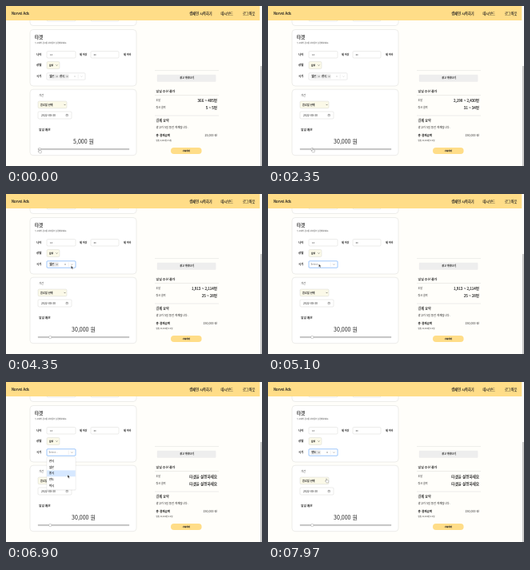
Animation of 320 by 200 pixels, one loop 8000 ms. Source, as an HTML page:

```html
<!DOCTYPE html>
<html lang="ko">
<head>
<meta charset="utf-8">
<style>
html, body { margin: 0; width: 100%; height: 100%; overflow: hidden; background: #fffefa; }
svg { display: block; width: 100%; height: 100%; }
text { font-family: "Noto Sans CJK KR", "Noto Sans CJK", "Noto Sans", sans-serif; white-space: pre; }
text[font-weight="500"] { stroke: #222; stroke-width: .13; }
</style>
</head>
<body>
<svg viewBox="0 0 320 200"><g id="page"></g><g id="live"></g></svg>
<script>
const LOOP = 8000, YELLOW = '#ffdd88', BLUE = '#4a96f8', INK = '#222';
const COUNTRIES = ['한국', '일본', '중국', '인도', '미국'];
const ROW = 7.8, MENU_TOP = 94.8;

// y is the vertical middle of the text
const text = (x, y, size, str, { fill = INK, anchor = 'start', weight = 400 } = {}) =>
  `<text x="${x}" y="${y + size * 0.37}" font-size="${size}" fill="${fill}" text-anchor="${anchor}" font-weight="${weight}">${str}</text>`;
const box = (x, y, w, h, fill, stroke = 'none', r = 0, line = 0.4) =>
  `<rect x="${x}" y="${y}" width="${w}" height="${h}" rx="${r}" fill="${fill}" stroke="${stroke}" stroke-width="${line}"/>`;
const path = (d, stroke, width = 0.5, fill = 'none') =>
  `<path d="${d}" fill="${fill}" stroke="${stroke}" stroke-width="${width}" stroke-linejoin="round"/>`;
const rule = y => path(`M186 ${y}H266`, '#d2d2d0', 0.4);
const cross = (x, y, r, color) => path(`M${x - r} ${y - r}l${2 * r} ${2 * r}m0 ${-2 * r}l${-2 * r} ${2 * r}`, color, 0.4);
const chevron = (x, y, color) => path(`M${x - 1} ${y - 0.5}l1 1l1 -1`, color);
const card = (y, h) => box(30, y, 133, h, '#fff', '#dadad7', 4, 0.5);
const field = (x, y, w, h, fill = '#fff') => box(x, y, w, h, fill, '#cfcfca', 1.5);

function drawPage() {
  const mid = { anchor: 'middle' }, bold = { weight: 500 };
  return card(-20, 44.5) + card(29.5, 70.5) + card(104.2, 82.5) +
    field(51, 10, 36, 9) + field(106, 10, 35, 9) +
    box(0, 0, 317.5, 18, YELLOW) +
    text(7, 9.2, 4.3, 'Norvel Ads', bold) +
    text(229.5, 9.2, 4.2, '캠페인 시작하기', bold) +
    text(268.5, 9.2, 4.2, '대시보드', bold) +
    text(296, 9.2, 4.2, '로그아웃', bold) +
    box(317.5, 0, 2.5, 200, '#fbfbfa') +
    box(318, 75, 1.7, 125, '#c1c1c1') +

    text(36, 39, 5.5, '타겟', bold) +
    text(36, 46, 2.4, '누구에게 광고를 보여줄지 설정해보세요.', { fill: '#444' }) +
    text(38, 60.5, 3.5, '나이', bold) +
    field(51, 56.5, 36, 8.5) + text(55, 60.8, 2.7, '14') + text(92, 60.5, 3.1, '세 이상', bold) +
    field(106, 56.5, 35, 8.5) + text(109.5, 60.8, 2.7, '40') + text(147, 60.5, 3.1, '세 이하', bold) +
    text(38, 74, 3.5, '성별', bold) +
    field(51, 69.5, 16, 9, '#fbf9e8') + text(54, 74, 2.8, '남성', bold) + chevron(63.5, 74, '#333') +
    text(38, 88, 3.5, '국가', bold) +

    text(41.5, 111.5, 3, '기간') +
    field(40, 119, 36, 8.8, '#fbf9e8') + text(43, 123.4, 3.2, '종료일 선택', bold) + chevron(73.5, 123.4, '#333') +
    field(40, 132, 42, 9) + text(44, 136.6, 3.5, '2022-08-30') +
    box(75, 135.4, 2.4, 2.4, 'none', '#333', 0.2, 0.3) + path('M75 136H77.4', '#333', 0.4) +
    text(41, 155, 3.7, '일일 예산', bold) +
    box(40, 178.3, 114, 1.3, '#d4d4d4', '#8a8a8a', 0.6, 0.35) +

    rule(80.6) + box(189, 86, 73.2, 8.5, '#eeeeee', '#e8e8e8', 0.8, 0.3) +
    text(226, 90.3, 3, '광고 미리보기', { ...mid, ...bold }) +
    text(187.6, 106.5, 3.9, '일일 추산 결과', bold) + rule(111.5) +
    text(187.6, 118, 3, '도달') + text(187.6, 127, 3, '링크 클릭') + rule(137) +
    text(187.6, 143.6, 4.1, '결제 요약', bold) +
    text(187.6, 151.3, 3.4, '광고가 5일 동안 게재됩니다.') +
    text(187.6, 161.8, 3.6, '총 결제금액', { weight: 700 }) +
    box(206, 177, 38.6, 8, YELLOW, 'none', 4) +
    text(225.4, 181, 2.7, '시작하기', { ...mid, ...bold });
}

// keys: [time, value, value...]
function along(keys, t, ease = u => u) {
  const i = keys.findIndex(k => k[0] > t);
  if (i < 0) return keys[keys.length - 1].slice(1);
  if (i === 0) return keys[0].slice(1);
  const a = keys[i - 1], b = keys[i], u = ease((t - a[0]) / (b[0] - a[0]));
  return a.slice(1).map((v, j) => v + (b[j + 1] - v) * u);
}
const smooth = u => u * u * (3 - 2 * u);
const won = n => Math.round(n).toLocaleString('en-US');

const BUDGET = [[780, 5], [960, 15], [1600, 21], [1960, 30]];
const POINTER = [
  [2300, 55.4, 179], [3130, 76.2, 87], [4030, 76.2, 87], [4350, 81.4, 89.6], [4500, 81.4, 89.6],
  [4830, 63.5, 87.5], [5750, 63.5, 87.5], [6150, 81.2, 88.6], [6330, 81.2, 88.6], [6650, 81.2, 88.6],
  [6900, 77, 116], [7250, 75.5, 128], [7500, 75.5, 128], [7780, 73, 121]
];

function estimates(t, budget) {
  if (t >= 5400) return Array(2).fill('타겟을 설정하세요');
  if (t >= 3830) return ['1,913 ~ 2,114명', '25 ~ 28명'];
  const range = (a, b) => `${won(Math.floor(budget * a))} ~ ${won(Math.floor(budget * b + 1e-6))}명`;
  return [range(0.07328, 0.081), range(0.001035, 0.001135)];
}

function chip(x, name, hot) {
  return box(x, 85.6, 12.2, 5, '#e6e6e6', 'none', 0.5) +
    (hot ? box(x + 8.4, 85.6, 3.8, 5, '#ffbdad', 'none', 0.5) : '') +
    text(x + 1, 88, 3, name, { weight: 500 }) + cross(x + 10.2, 88.1, 0.7, hot ? '#de350b' : '#333');
}

function countrySelect(t) {
  const chips = t < 3180 ? ['일본', '한국'] : t < 5100 ? ['일본'] : t < 7970 ? [] : ['인도'];
  const right = t < 3230 ? 99 : 87, focus = t >= 3750;
  const tone = focus ? '#666' : '#bbb';
  let out = box(51, 83.8, right - 51, 8.4, '#fff', focus ? BLUE : '#cccccc', 1, focus ? 0.55 : 0.4);
  chips.forEach((name, i) => {
    const hot = i === chips.length - 1 && (t > 3080 && t < 3180 || t > 4830 && t < 5100);
    out += chip(53.5 + i * 12.8, name, hot);
  });
  if (chips.length) out += cross(right - 13, 88, 0.8, tone);
  else out += text(53.5, 88, 3, 'Select...', { fill: '#777' });
  return out + path(`M${right - 8.8} 85.5V90.5`, '#ccc', 0.3) + chevron(right - 4.6, 88, tone);
}

function menu(pointerY) {
  const hover = Math.max(0, Math.min(4, Math.floor((pointerY - MENU_TOP) / ROW)));
  return box(50.7, 94, 36.6, 41.6, 'rgba(0,0,0,.08)', 'none', 1) +
    box(51, 93.9, 36, 40.8, '#fff', '#d9d9d9', 1, 0.3) +
    COUNTRIES.map((name, i) =>
      (i === hover ? box(51.2, MENU_TOP + i * ROW, 35.6, ROW, '#d6e8ff') : '') +
      text(54, MENU_TOP + (i + 0.5) * ROW, 3.2, name, { weight: 500 })).join('');
}

const arrow = (x, y) => path(`M${x} ${y}v3.9l.95 -.85l.65 1.5l.75 -.35l-.65 -1.4h1.2z`, '#fff', 0.35, '#222');
const hand = (x, y) => path(`M${x - 0.4} ${y}q.5 -.5 .9 0v1.6l2 .5q.5 .2 .4 .8l-.5 2h-2.4l-1.6 -2q0 -.6 .6 -.4l.6 .5z`, '#555', 0.3, '#fff');

function drawLive(t) {
  const k = Math.round(along(BUDGET, t)[0]), budget = k * 1000;
  const thumb = 42 + 0.53 * (k - 5), pressed = t >= 475 && t < 2100;
  const [px, py] = t < 2300 ? [thumb - 0.4 + Math.min(t / 150, 1) * 0.5, 179] : along(POINTER, t, smooth);
  const end = { anchor: 'end' }, strong = { anchor: 'end', weight: 500 };
  const [reach, clicks] = estimates(t, budget);
  const pointer = t < 2400 || t >= 7970 ? hand : arrow;
  return text(97, 169, 7, `${won(budget)} 원`, { anchor: 'middle' }) +
    `<circle cx="${thumb}" cy="179" r="1.7" fill="${pressed ? '#f6c860' : '#fff'}" stroke="${pressed ? '#d89b20' : '#8a8a8a'}" stroke-width=".35"/>` +
    text(264, 118, 4.55, reach, strong) +
    text(264, 127, 4.55, clicks, strong) +
    text(263.8, 161.8, 3.6, `${won(budget * 5)} 원`, end) +
    text(187.6, 168.2, 2.4, `일일 ${won(budget)}원 X 5일`, { fill: '#333' }) +
    countrySelect(t) +
    (t >= 6330 && t < 7970 ? menu(py) : '') +
    pointer(px, py);
}

const live = document.getElementById('live');
document.getElementById('page').innerHTML = drawPage();
const start = performance.now();
function tick() {
  live.innerHTML = drawLive((performance.now() - start) % LOOP);
  requestAnimationFrame(tick);
}
tick();
</script>
</body>
</html>
```
